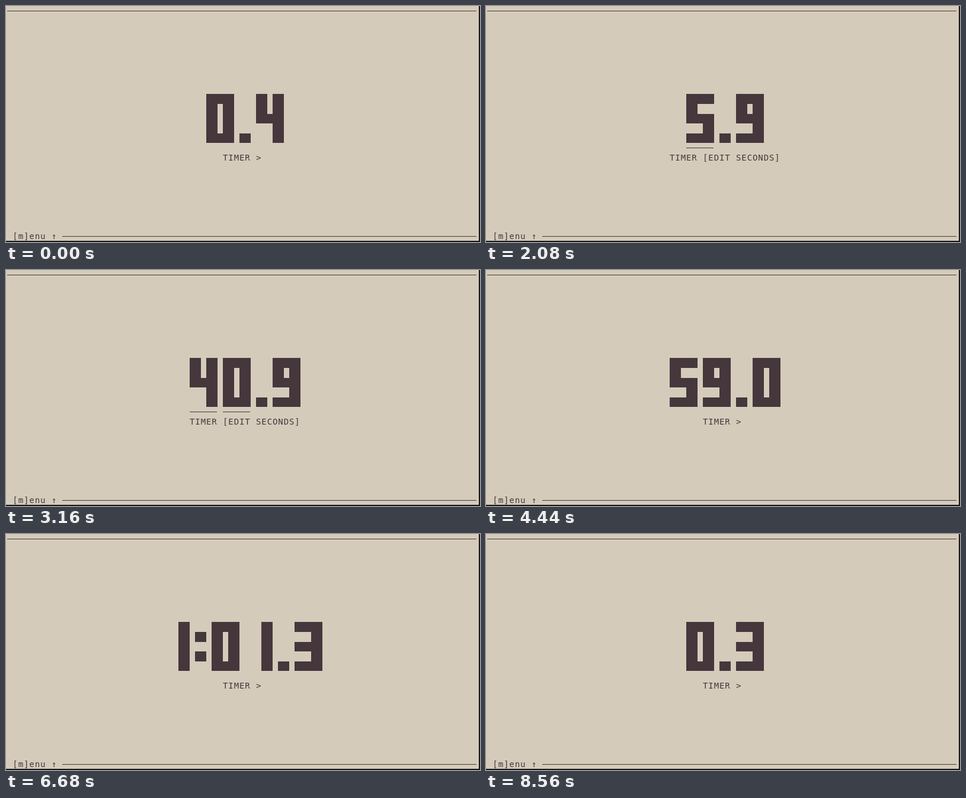
Recreate the animation shown at these times as an HTML page with a canvas. Size 800 by 400 pixels, loop 8.68 s.

```html
<!DOCTYPE html>
<html lang="en">
<head>
<meta charset="utf-8">
<title>Timer</title>
<style>
  html, body { margin: 0; width: 100%; height: 100%; overflow: hidden; background: #d5cbba; }
  canvas { display: block; }
</style>
</head>
<body>
<canvas id="stage" width="800" height="400"></canvas>
<script>
const ctx = document.getElementById('stage').getContext('2d');
const LOOP = 8680, STEP = 40;
const BG = '#d5cbba', INK = '#45373c', EDGE = '#171717';

// Terminal grid
const COLS = 85, CELL_W = 28 / 3, CELL_H = 16.6, PAD = 2;
const FONT_SIZE = 14, GLYPH_W = 8.43;
const colX = c => PAD + c * CELL_W;
const rowY = r => r * CELL_H;
const center = w => Math.ceil((COLS - w) / 2);
const DIGIT_ROW = 9, LINE_ROW = 14, LABEL_ROW = 15, MENU_ROW = 23;

// Row patterns of five cells, top to bottom
const ROWS = { f: '11111', l: '11000', r: '00011', b: '11011' };
const DIGITS = ['fbbbf', 'rrrrr', 'frflf', 'frfrf', 'bbfrr',
                'flfrf', 'flfbf', 'frrrr', 'fbfbf', 'fbfrf'];

const isDigit = ch => ch >= '0' && ch <= '9';
const widthOf = ch => isDigit(ch) ? 5 : 2;

function patternOf(ch) {
  if (isDigit(ch)) return [...DIGITS[ch]].map(k => ROWS[k]);
  return ch === '.' ? ['', '', '', '', '11'] : ['', '11', '', '11', ''];
}

function drawCells(rows, col) {
  rows.forEach((bits, r) => {
    const top = Math.round(rowY(DIGIT_ROW + r));
    const bottom = Math.round(rowY(DIGIT_ROW + r + 1));
    [...bits].forEach((bit, c) => {
      if (bit !== '1') return;
      const left = Math.round(colX(col + c));
      ctx.fillRect(left, top, Math.round(colX(col + c + 1)) - left, bottom - top);
    });
  });
}

function drawRule(col, cells, row) {
  const left = Math.round(colX(col));
  const right = Math.round(colX(col + cells - 1) + GLYPH_W);
  ctx.fillRect(left, Math.floor(rowY(row + 0.5)), right - left, 1);
}

function drawText(text, col, row) {
  ctx.fillText(text, colX(col), Math.round(rowY(row) + 13.1));
}

function clockText(decis) {
  const min = Math.floor(decis / 600);
  const sec = Math.floor(decis / 10) % 60;
  const head = min ? min + ':' + String(sec).padStart(2, '0') : String(sec);
  return head + '.' + decis % 10;
}

function drawClock(decis, edit) {
  const text = clockText(decis);
  const total = [...text].reduce((sum, ch) => sum + widthOf(ch) + 1, -1);
  const dot = text.indexOf('.');
  let col = center(total);
  [...text].forEach((ch, i) => {
    drawCells(patternOf(ch), col);
    const marked = edit === 'SECONDS' ? i < dot : edit === 'DECIS' && i > dot;
    if (marked) drawRule(col, 5, LINE_ROW);
    col += widthOf(ch) + 1;
  });
}

const countPassed = (times, t) => times.filter(x => t >= x).length;

function ticks(steps, phase) {
  return Math.max(0, Math.ceil((steps + 1 - phase) / 2.44) - 1);
}

function stateAt(t) {
  const n = Math.floor(t / STEP);
  if (t < 1080) return { decis: 4 + ticks(n, -0.42), status: '>' };
  if (t < 1400) return { decis: 15, status: '||' };
  if (t < 1760) {
    return { decis: 15 + countPassed([1480, 1560, 1600, 1680], t), edit: 'DECIS' };
  }
  if (t < 4440) {
    const held = Math.max(0, Math.min(44, n - 49));
    return { decis: 19 + 10 * Math.floor(held * 57 / 44 + 0.2), edit: 'SECONDS' };
  }
  if (t < 4560) return { decis: 590, status: '>' };
  if (t < 8040) return { decis: 590 + ticks(n - 111, 0.14), status: '>' };
  if (t < 8320) return { decis: 627 + Math.floor((t - 8040) / 80), status: '>' };
  return { decis: Math.floor((t - 8320) / 80), status: '>' };
}

function draw(t) {
  const { decis, status, edit } = stateAt(t);
  ctx.fillStyle = BG;
  ctx.fillRect(0, 0, 800, 400);
  ctx.fillStyle = EDGE;
  ctx.fillRect(798, 0, 2, 400);
  ctx.fillRect(0, 398, 800, 2);

  ctx.fillStyle = INK;
  ctx.font = FONT_SIZE + 'px "DejaVu Sans Mono", monospace';
  ctx.letterSpacing = (CELL_W - GLYPH_W).toFixed(3) + 'px';
  drawRule(0, COLS, 0);
  drawRule(10, COLS - 10, MENU_ROW);
  drawText('[m]enu ↑', 1, MENU_ROW);

  drawClock(decis, edit);
  const label = 'TIMER ' + (edit ? '[EDIT ' + edit + ']' : status);
  drawText(label, center(label.length), LABEL_ROW);
}

const start = performance.now();
function frame() {
  draw((performance.now() - start) % LOOP);
  requestAnimationFrame(frame);
}
frame();
</script>
</body>
</html>
```
